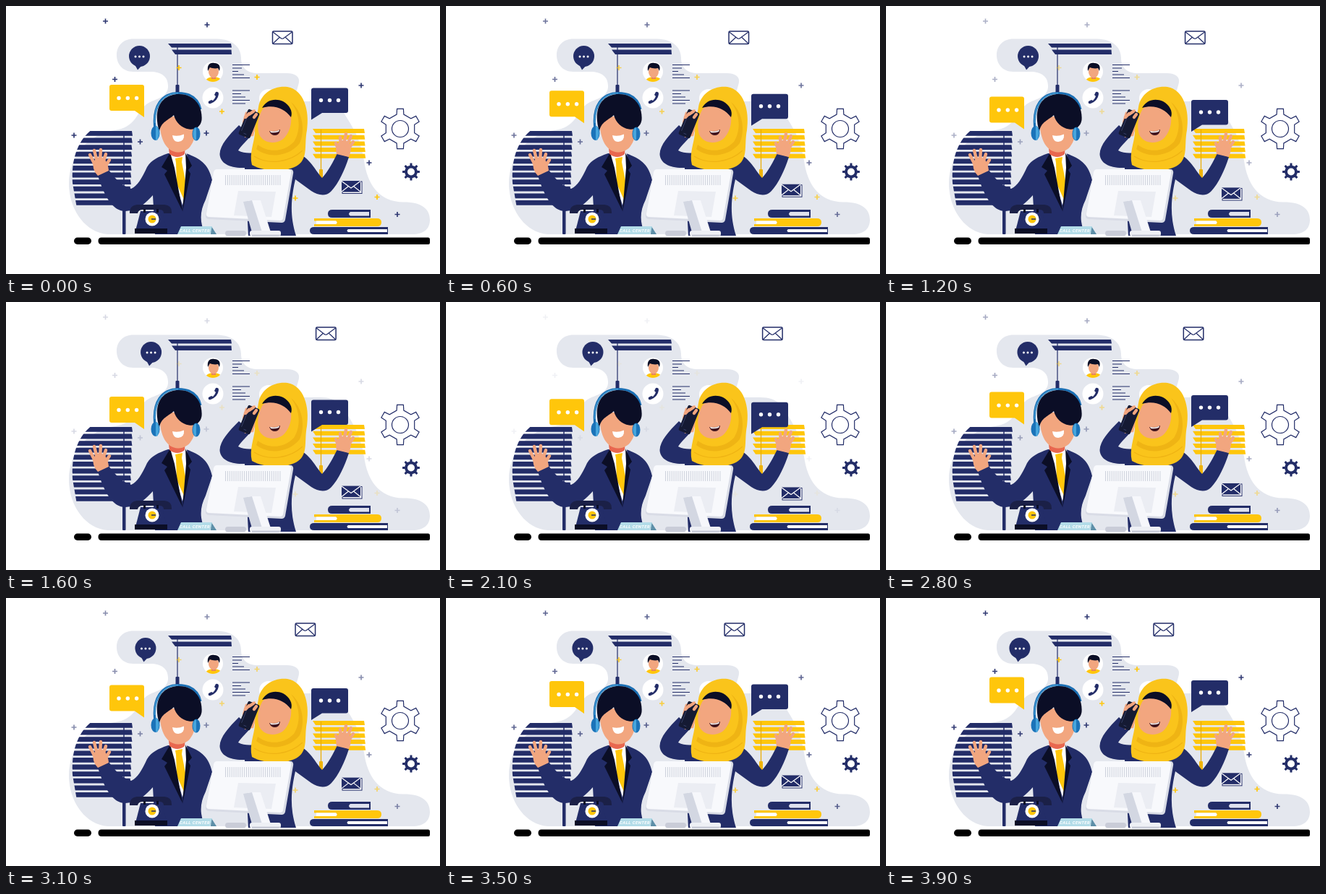
Write an HTML page that moves like this. It is 600x371 px and loops after 4 s.

```html
<!DOCTYPE html>
<html lang="en">
<head>
<meta charset="utf-8">
<title>Call center</title>
<style>
  html, body { margin: 0; width: 100%; height: 100%; overflow: hidden; background: #fff; }
  svg { display: block; width: 600px; height: 371px; }
  .navy { fill: #232d68; }
  .dark { fill: #0b0e26; }
  .gold { fill: #ffc60b; }
  .skin { fill: #f2a67f; }
  .white { fill: #fff; }
  .line { fill: none; stroke: #232d68; stroke-width: 1.5; }
  .thin { stroke-width: 1.2; }
  .fingers { fill: none; stroke: #f2a67f; stroke-width: 4.4; stroke-linecap: round; stroke-linejoin: round; }
  .dots { fill: none; stroke: #fff; stroke-width: 5.4; stroke-linecap: round; }
  #pluses { opacity: calc(1 - var(--p)); fill: none; stroke-width: 1.7; }
  #mail { transform: translateX(calc(var(--p) * 74px)); }
  #chat { transform: translateX(calc(var(--p) * 19.8px)); }
  .drop { transform: translateY(calc(var(--p) * 27px)); }
  #note { transform: translateY(calc(var(--p) * 15.5px)); }
</style>
</head>
<body>
<svg viewBox="0 0 600 371" style="--p:0">
  <defs>
    <clipPath id="window"><path d="M120 170C97 187 90 216 92 245L98 280H180V170Z"/></clipPath>
    <clipPath id="avatar"><circle cx="286" cy="91" r="14"/></clipPath>
  </defs>

  <!-- backdrop -->
  <path fill="#e4e7ee" d="M176 45.500H292C312 46 325 56 325 72C325 86 334 93 348 93H388C400 93 406 98 405 105C404 114 398 120 404 132H434C460 132 466 146 472 156C485 176 492 194 495 214C500 250 518 271.500 550 271.500C576 271.500 586 282 586 296C586 309 577 316 562 316H140C108 313 87 280 87 246C87 205 115 178 150 172C178 168 180 150 190 140C200 128 222 130 224 113C225 98 215 91 200 91H176C161 91 153 80 153 68C153 55 162 45.500 176 45.500Z"/>

  <!-- blinds -->
  <path class="navy" d="M224 52H311L312 57.500H229ZM229 60.500H311.500L312 67H234Z"/>
  <path class="line" d="M237 54V112" style="stroke-width:1.200"/>
  <rect class="navy" x="234.500" y="109" width="5" height="14" rx="1"/>
  <path id="slatsLeft" class="navy" clip-path="url(#window)"/>
  <path class="line" d="M163 174V284"/>
  <rect class="navy" x="161" y="281" width="4.500" height="35" rx="1"/>
  <path id="slatsRight" class="gold"/>
  <path stroke="#e9ae08" stroke-width="1.300" d="M435.500 171V228"/>
  <rect x="433" y="226" width="5" height="12" rx="1" fill="#f0b40a"/>

  <g id="pluses">
    <path id="plusNavy" stroke="#303a73"/>
    <path id="plusGold" stroke="#ffc60b"/>
  </g>

  <!-- contact list -->
  <g class="white">
    <circle cx="286" cy="91" r="14"/>
    <circle cx="286" cy="127" r="14.500"/>
    <circle cx="363" cy="128" r="13"/>
  </g>
  <g clip-path="url(#avatar)">
    <ellipse class="gold" cx="287" cy="104" rx="11" ry="6"/>
    <rect x="284" y="95" width="6" height="6" fill="#e8805c"/>
    <ellipse class="skin" cx="287" cy="91" rx="7" ry="8.500"/>
  </g>
  <path class="dark" d="M279 90C278 82 281 78 288 79C295 79 297 84 295 90L293 86C289 87 284 86 282 85Z"/>
  <path class="navy" d="M290 119Q294 118 294 122Q293 131 283 135Q279 136 280 132L284 130L286 131Q289 128 290 125L288 123Z"/>
  <path class="line thin" d="M313 81.500h24m-24 4.500h13m-13 4.500h8m-8 4.500h16m-16 4.500h24M313 117h24m-24 4.500h12m-12 4.500h18m-18 4.500h24m-24 4.500h18"/>

  <!-- gears -->
  <path id="gearBig" class="line thin" style="fill:#fff"/>
  <circle class="line thin" cx="545" cy="170" r="11.500"/>
  <path id="gearSmall" class="navy"/>
  <circle class="white" cx="560" cy="229.500" r="5"/>

  <!-- books -->
  <g>
    <path class="navy" d="M451 282H504V293H451Q445 293 445 287.500T451 282Z"/>
    <path fill="#dfe2ee" d="M476 285H502V290.500H476Q472 288 476 285Z"/>
    <path class="gold" d="M426 294H513Q519 294 519 299.500T513 305H426V302H456Q459 299.500 456 297.500H426Z"/>
    <path class="white" d="M429 297.500H456Q459 299.500 456 302H429Z"/>
    <path class="navy" d="M426 306H528V316H426Q420 316 420 311T426 306Z"/>
    <path class="white" d="M473 309H527V313H473Q470 311 473 309Z"/>
  </g>

  <!-- woman -->
  <g>
    <path class="navy" d="M344 203C358 214 385 212 400 203C420 208 428 229 437 238C446 228 452 216 458 204L474 209C468 228 459 247 449 257C442 264 431 262 422 256L400 240C394 266 392 290 401 318H335L330 224C310 225 296 218 295.500 205C296 192 308 179 322 165L338 180C333 187 325 193 321 200C328 204 337 204 344 203Z"/>
    <path class="skin" d="M457 205C455 196 457 188 465 186C476 186 480 194 474 209Z"/>
    <path class="fingers" d="M460 200L456 190M463 193L462 182M467 192L470 177M471 194L477 180M474 197L480 188"/>
    <path class="skin" d="M327 160L331 147L344 143L349 152L342 180L330 182Z"/>
    <path fill="#fac41b" d="M349 140C352 121 370 110 389 112C412 116 420 145 416 172C412 192 418 210 404 220C388 231 358 230 340 220C336 204 343 190 344 176C344 163 347 152 349 140Z"/>
    <path fill="#efb414" d="M394 133C407 150 408 172 398 188C384 203 362 203 348 192L346 198C364 212 392 208 406 190C414 172 410 146 394 133Z"/>
    <path fill="none" stroke="#efb414" stroke-width="1.300" d="M343 208C364 221 393 216 410 200"/>
    <path class="skin" d="M353 146C360 132 381 131 392 146C398 160 391 178 382 185C371 192 356 190 350 178C347 168 348 156 353 146Z"/>
    <path class="dark" d="M354 141C360 130 372 127 383 132C392 137 397 146 394 154C385 142 371 136 354 141Z"/>
    <path fill="#40131d" d="M364 173Q372 175 379 171Q378 179 372 179Q366 179 364 173Z"/>
    <path class="white" d="M365 173Q372 175 378 171.500L377 174Q371 176 366 175Z"/>
    <g transform="rotate(22 336 163)">
      <rect x="327.500" y="144" width="17" height="38" rx="2.500" fill="#151a33"/>
      <path fill="none" stroke="#3c4570" stroke-width=".8" d="M330 149V176M334 178h4"/>
    </g>
    <path class="fingers" d="M331 154L336 149M336 150L342 146M343 154L346 150"/>
  </g>

  <!-- man -->
  <g>
    <path class="navy" d="M224 204C210 209 201 213 195 223C188 238 182 249 173 253C160 249 151 239 142 227L127 235C136 263 147 284 165 284C182 283 192 274 203 262L206 316H276C267 300 268 284 276 268L285 241C280 218 268 211 249 204Z"/>
    <path class="skin" d="M127 235C119 227 118 215 126 210C136 207 141 216 142 228Z"/>
    <path class="fingers" d="M124 222L116 206M126 216L122 200M130 214L131 199M134 217L138 205M136 224L143 213"/>
    <path class="white" d="M227 204H250L252 232L244 276L228 222Z"/>
    <path class="gold" d="M234 211L244 209L243 216L250 252L246 268L236 246L235 217Z"/>
    <path class="dark" d="M227 203L215 223L223 228L219 233L244 284L233 224ZM248 203L257 221L252 227L255 232L244 285L249 224Z"/>
    <path fill="#e8674f" d="M224 190H248L247 205Q237 213 226 205Z"/>
    <path class="skin" d="M213 153H262C264 181 259 201 238 202.500C220 202 211 181 213 153Z"/>
    <path fill="none" stroke="#1b6fb4" stroke-width="3.200" d="M206 170C202 138 216 120.500 238 120.500C257 120.500 266 130 269 143"/>
    <path class="dark" d="M212 174C204 148 210 123 239 122C262 122 272 140 270.500 158C269 168 260 172 253 170.500C243 169 235 162 232 151C225 158 214 160 212 174Z"/>
    <path fill="none" stroke="#58afdf" stroke-width="1" d="M206 162C204 138 217 121 238 120.500"/>
    <path class="white" d="M230 179Q238 181 246 177.500Q247 187.500 238 188Q231 188 230 179Z"/>
    <ellipse cx="206.500" cy="176" rx="6" ry="10" fill="#1b73b9"/>
    <path fill="#46a5dc" d="M209 166.500Q214 176 209 186L207 185V167Z"/>
    <ellipse cx="263" cy="177" rx="5.500" ry="9.500" fill="#1b73b9"/>
    <path fill="#46a5dc" d="M261 168.500Q256 177 261 186L263 185V169Z"/>
  </g>

  <!-- desk -->
  <g>
    <path class="navy" d="M186 284H216L223 315H178Z"/>
    <path fill="#1b2047" d="M181 275H219Q229 276 229 285V287H218Q218 282 212 282H189Q183 282 182 287H171V284Q172 276 181 275Z"/>
    <path class="dark" d="M178 308H223V315H178ZM190 281h3v5h-3zM208 281h3v5h-3z"/>
    <circle class="white" cx="202" cy="295" r="9.500"/>
    <circle class="gold" cx="202" cy="295" r="5.500"/>
    <path class="line" d="M201 295h6"/>

    <path fill="#5d8fa8" d="M284 305L291 316H283Z"/>
    <path fill="#b3dce8" d="M242 305H285L282 316H237Z"/>
    <text x="240" y="313" fill="#fff" font-family="Roboto, sans-serif" font-size="6" font-weight="700" font-style="italic" letter-spacing=".45">CALL CENTER</text>

    <path fill="#d9dce6" d="M291 226H394Q398 227 397 232L386 296Q385 300 381 300L280 295Q275 294 276 290L287 230Q288 226 291 226Z"/>
    <path fill="#f8f9fc" d="M291 226H391Q395 227 394 232L383 294Q382 297 379 297L280 292Q276 291 277 287L287 230Q288 226 291 226Z"/>
    <path fill="#ebedf3" d="M321 256L373 257L367 292L315 290Z"/>
    <path stroke="#ced2dc" stroke-width="14" stroke-dasharray="1 1.900" d="M303 241H380"/>
    <rect x="303" y="311" width="29" height="7.500" rx="3.700" fill="#c9ccd8"/>
    <path fill="#f6f7fb" d="M335 269H352L366 313H346Z"/>
    <path fill="#d3d7e2" d="M328 271L340 269L354 313H340Z"/>
    <rect x="337" y="311" width="43" height="7.500" rx="3" fill="#eef0f5"/>
    <path fill="#c9ccd8" d="M340 316.500H380Q379 319 376 319H340Z"/>
    <rect x="94" y="320.500" width="24" height="9.500" rx="4.700"/>
    <path d="M132 320.500H584Q586 320.500 586 323V327.500Q586 330 584 330H132Q127.500 330 127.500 325.200T132 320.500Z"/>
  </g>

  <!-- messages -->
  <g id="mail">
    <rect class="line" x="368.500" y="35" width="27.500" height="17.500" rx="1.500" style="fill:#fff"/>
    <path class="line thin" d="M369 36L380 44.500Q382 46 384 44.500L395.500 36M369 52L378 43.500M395.500 52L386.500 43.500"/>
  </g>
  <g id="chat">
    <path class="navy" d="M178 81H189L182 88.500Z"/>
    <circle class="navy" cx="184.500" cy="69.500" r="14.500"/>
    <path class="dots" d="M179 70h0m5.500 0h0m5.500 0h0" style="stroke-width:3"/>
  </g>
  <g class="drop">
    <path class="gold" d="M146 109H188Q191 109 191 112V154L178 145H146Q143 145 143 142V112Q143 109 146 109Z"/>
    <path class="dots" d="M156 127.500h0m12.300 0h0m12.300 0h0"/>
  </g>
  <g class="drop">
    <path class="navy" d="M425 113.500H470Q473 113.500 473 116.500V145Q473 148 470 148H437L422 157.500V116.500Q422 113.500 425 113.500Z"/>
    <path class="dots" d="M435.500 130.500h0m12 0h0m12 0h0"/>
  </g>
  <g id="note">
    <rect class="line" x="465" y="243" width="27" height="16.500" style="fill:#fff;stroke-width:1"/>
    <rect class="navy" x="464" y="242" width="26" height="15.500"/>
    <path fill="none" stroke="#fff" stroke-width="1.200" d="M464 242.500L477 252L490 242.500M464 257L473.500 249.500M490 257L480.500 249.500"/>
  </g>
</svg>
<script>
  const svg = document.querySelector('svg');
  const draw = (id, d) => document.getElementById(id).setAttribute('d', d);

  // Each slat is a parallelogram; lean shifts the right end row by row.
  const slats = (x, y, w, h, pitch, count, lean) =>
    Array.from({ length: count }, (_, i) =>
      `M${x} ${y + i * pitch}h${w - i * lean}l1 ${h}H${x + 4}Z`).join('');

  const plus = (points) =>
    points.map(([x, y]) => `M${x - 3.5} ${y}h7m-3.5 -3.5v7`).join('');

  function gear(cx, cy, tip, root, teeth) {
    const step = 2 * Math.PI / teeth;
    const corners = [[root, -.23], [tip, -.15], [tip, .15], [root, .23]];
    const points = [];
    for (let i = 0; i < teeth; i++) {
      for (const [r, k] of corners) {
        const a = (i + k) * step - Math.PI / 2;
        points.push(`${(cx + r * Math.cos(a)).toFixed(2)} ${(cy + r * Math.sin(a)).toFixed(2)}`);
      }
    }
    return `M${points.join('L')}Z`;
  }

  draw('slatsLeft', slats(88, 173, 86, 6.8, 9.6, 11, .3));
  draw('slatsRight', slats(424, 170, 71, 6, 8.7, 5, -.3));
  draw('gearBig', gear(545, 170, 28, 20.5, 6));
  draw('gearSmall', gear(560, 229.5, 12, 9, 8));
  draw('plusNavy', plus([[137.5, 21], [278, 26], [150.5, 101.5], [94, 179], [185.5, 188],
    [277, 176], [491, 110], [502, 217], [541, 288.5]]));
  draw('plusGold', plus([[239, 85.5], [347, 98.5], [298.5, 146], [400, 266], [513, 264.5]]));

  const LOOP = 4000, FRAME = 100, PEAK = 1970;

  function tick() {
    const time = performance.now() % LOOP;
    const t = Math.floor(time / FRAME) * FRAME;
    svg.style.setProperty('--p', 1 - Math.abs(t - PEAK) / PEAK);
    requestAnimationFrame(tick);
  }
  tick();
</script>
</body>
</html>
```
